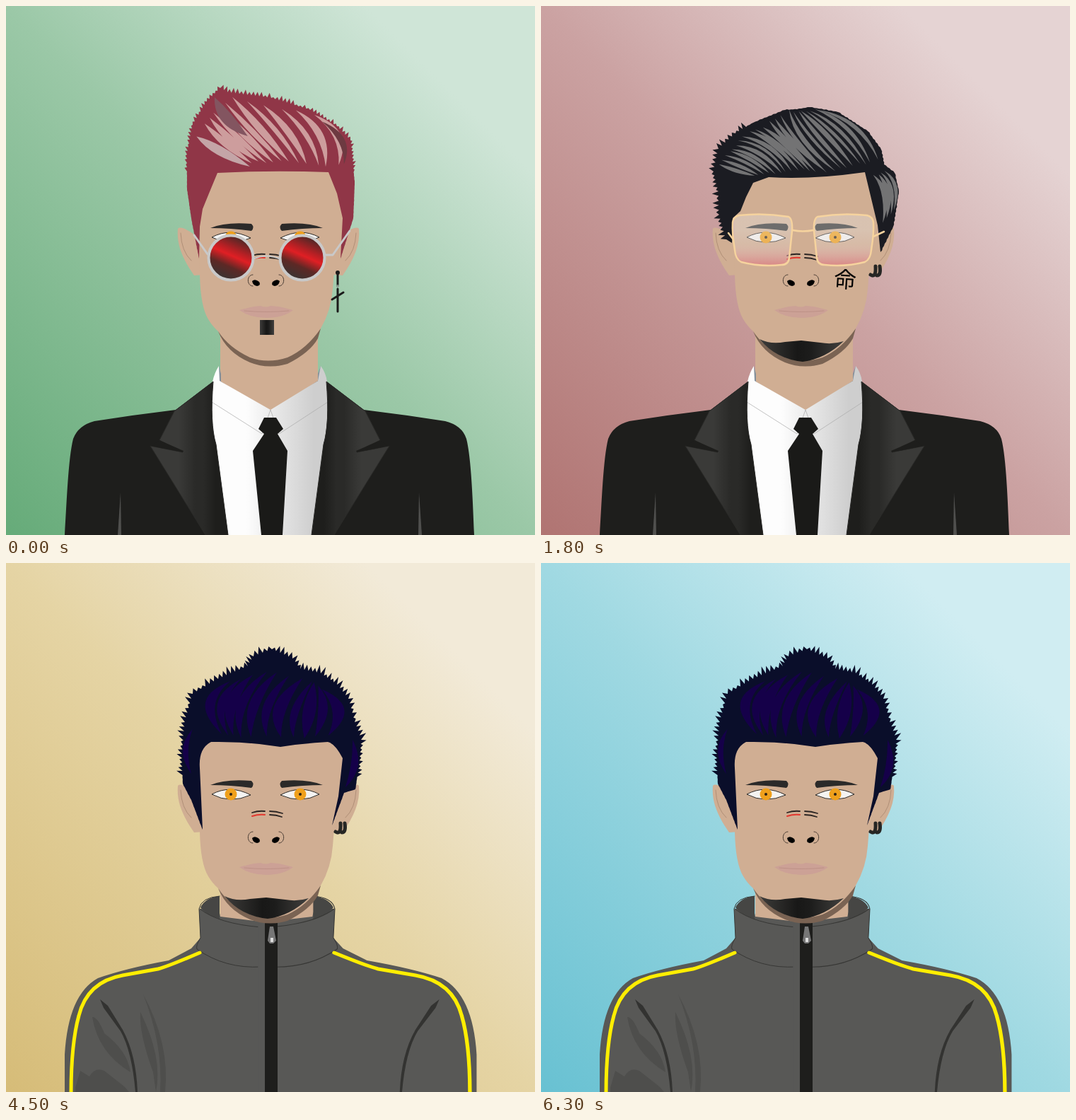
Recreate the animation shown at these times as an HTML page. Size 748 by 748 pixels, loop 7200 ms.

```html
<!DOCTYPE html>
<html lang="en">
<head>
<meta charset="utf-8">
<title>Portraits</title>
<style>
html, body { margin: 0; width: 100%; height: 100%; overflow: hidden; }
svg { display: block; width: 100vw; height: 100vh; }
.line { fill: none; stroke-linecap: round; stroke-linejoin: round; }
.skin { fill: #d0ae93; }
.cloth { fill: var(--cloth); }
.slit { fill: var(--slit); }
</style>
</head>
<body>
<svg viewBox="0 0 748 748">
<defs>
  <linearGradient id="sky" x1="0" y1="1" x2="1" y2="0">
    <stop style="stop-color:var(--low)"/><stop offset=".5" style="stop-color:var(--mid)"/><stop offset=".84" style="stop-color:var(--high)"/>
  </linearGradient>
  <linearGradient id="satin">
    <stop offset=".36" style="stop-color:var(--lapel1)"/><stop offset=".58" style="stop-color:var(--lapel2)"/>
    <stop offset=".68" style="stop-color:var(--lapel2)"/><stop offset=".84" style="stop-color:var(--lapel3)"/>
  </linearGradient>
  <linearGradient id="linen"><stop offset=".3" stop-color="#fdfdfd"/><stop offset=".6" stop-color="#e4e4e4"/><stop offset=".88" stop-color="#cecece"/></linearGradient>
  <linearGradient id="whisker"><stop stop-color="#3d3c3a"/><stop offset=".45" stop-color="#181817"/><stop offset=".6" stop-color="#1c1c1b"/><stop offset="1" stop-color="#41403e"/></linearGradient>
  <linearGradient id="ruby" x1=".3" y1=".95" x2=".7" y2=".05">
    <stop stop-color="#3a3432"/><stop offset=".3" stop-color="#5d2825"/><stop offset=".55" stop-color="#e01f24"/><stop offset=".7" stop-color="#b32024"/><stop offset="1" stop-color="#4b2826"/>
  </linearGradient>
  <linearGradient id="rose" x2="0" y2="1">
    <stop offset=".3" stop-color="#e8e8e8" stop-opacity=".35"/><stop offset=".58" stop-color="#e6d8d4" stop-opacity=".3"/><stop offset="1" stop-color="#dc7880" stop-opacity=".72"/>
  </linearGradient>
  <linearGradient id="pelt" x1=".1" y1="1" x2=".95" y2="0">
    <stop stop-color="#1e1a17"/><stop offset=".12" stop-color="#4a2c1d"/><stop offset=".5" stop-color="#6c5138"/><stop offset=".8" stop-color="#4b3020"/><stop offset="1" stop-color="#1e1b19"/>
  </linearGradient>
  <linearGradient id="fold" x2="1" y2=".8"><stop offset=".3" stop-color="#dadada"/><stop offset=".39" stop-color="#ebebeb"/><stop offset=".5" stop-color="#dadada"/><stop offset=".72" stop-color="#d0cccc"/><stop offset=".8" stop-color="#e2e2e2"/></linearGradient>
  <filter id="soft" x="-10%" y="-10%" width="120%" height="120%"><feGaussianBlur stdDeviation="1.6"/></filter>
</defs>

<rect width="748" height="748" fill="url(#sky)"/>
<path class="skin" d="M303 455V535L374 575 441 535V455Z"/>

<g id="suit" class="part">
  <path class="cloth" d="M83 748C86 700 88 640 95 612Q102 593 125 587 182 578 240 571L293 531 302 530 374 575 441 530 453 531 506 571Q564 578 621 587 645 593 651 612C658 640 660 700 662 748Z"/>
  <path fill="#85909a" d="M301 509L298 535 304 534V520ZM445 509L448 535 441 534V520Z"/>
  <path fill="url(#linen)" d="M301 509L302 530 374 571 441 530 445 509Q452 518 454 531 457 590 449 620L434 748H314L297 620Q288 590 292 531 295 518 301 509Z"/>
  <path class="line" stroke="#aaa" stroke-width=".7" d="M291 560L362 605 374 571 386 605 455 560"/>
  <g id="lapel">
    <path fill="url(#satin)" style="stroke:var(--edge)" d="M293 531L238 573 217 614 250 631 204 622 282 748H314L297 620Q288 590 293 531Z"/>
    <path class="cloth" d="M217 614L251 629 250 631 204 622Z"/>
    <path class="slit" d="M162 688L158 748H163Z"/>
  </g>
  <use href="#lapel" transform="matrix(-1 0 0 1 746 0)"/>
</g>
<path id="tie" class="part" fill="#1a1a18" d="M365 582H382L392 598 384 605 398 629 391 748H361L349 629 365 605 357 598Z"/>
<g id="bow" class="part">
  <path id="wing" fill="#272725" d="M311 559Q335 559 352 571L364 580V601L350 605Q335 611 315 628 302 612 300 597 309 580 311 559Z"/>
  <use href="#wing" transform="matrix(-1 0 0 1 744 0)"/>
  <rect x="362" y="580" width="21" height="20" rx="3" fill="#141412"/>
  <circle cx="372" cy="691" r="6" fill="#1c1c1a"/>
</g>

<g id="parka" class="part">
  <path fill="#dbdbdb" d="M61 748Q62 710 70 685 65 660 75 640 82 610 110 595L134 582 200 540H302L330 600H415L444 540H560L608 572 640 592Q667 605 682 632 692 650 691 685 698 710 698 748Z"/>
  <path class="line" stroke="#c4bdbd" stroke-width="3" filter="url(#soft)" d="M75 659H147M165 668H322M75 715H148M165 722H322M452 672H592M604 658H688M452 723H592M604 713H686"/>
  <path class="line" stroke="#aaa" stroke-width="2" d="M153 640Q160 690 158 748M602 640Q594 690 598 748"/>
  <path fill="#3c3c3a" d="M311 535Q376 561 442 535 446 570 470 608 440 640 438 748H322Q338 645 288 609 310 575 311 535Z"/>
  <path id="fur" fill="url(#pelt)"/>
  <use href="#fur" transform="matrix(-1 0 0 1 743 0)"/>
  <path fill="#ededed" d="M290 458Q302 460 301 477L303 490Q313 512 311 545 302 582 289 609 260 612 242 600 222 597 218 585 220 575 235 563 256 530 268 488 277 460 290 458Z"/>
  <path fill="url(#fold)" d="M441 465Q452 449 468 450 482 455 484 488 498 530 521 560 531 570 527 580 504 590 490 605 481 613 470 608 437 560 441 465Z"/>
  <g class="line">
    <path stroke="#f2f2f2" stroke-width="8" d="M285 614Q320 628 330 665 334 700 325 748M477 613Q446 645 442 690V748"/>
    <path stroke="#191918" stroke-width="4" d="M220 586Q226 594 241 597 255 614 282 613 317 628 327 665 331 700 321 748M525 578Q519 588 504 589 490 609 475 611 442 645 439 690V748"/>
  </g>
</g>

<g id="track" class="part">
  <g id="sleeve">
    <path fill="#585856" d="M83 748V695Q88 610 130 587 170 573 230 562L262 545 275 530 273 490Q300 475 303 500L376 509V748Z"/>
    <path fill="#464644" d="M275 487Q282 473 302 471V503Q283 498 275 487Z"/>
    <path class="line" stroke="#373735" d="M302 471Q276 473 273 489L275 530Q268 541 270 546 310 574 361 571V515Q300 510 274 489"/>
    <path fill="#333331" d="M133 617L144 626 165 660Q184 695 186 748H183Q178 690 162 662L138 629Z"/>
    <path class="line" stroke="#fe0" stroke-width="5" d="M274 551Q230 570 215 574L165 583Q115 592 103 640 92 680 92 750"/>
  </g>
  <use href="#sleeve" transform="matrix(-1.055 0 0 1 753 0)"/>
  <path fill="#4e4e4c" d="M194 610Q232 680 225 748H218Q222 680 194 610ZM122 642Q130 642 139 665 172 690 176 720 130 692 122 642ZM98 742L105 718 118 726Q126 712 139 718L167 740 174 748H98ZM190 635Q188 665 208 720L212 748Q222 700 190 635Z"/>
  <rect x="366" y="509" width="18" height="239" fill="#1e1e1c"/>
  <path fill="#777" d="M373 514H378L382 534 378 538H373L370 534Z"/><rect x="374" y="530" width="4" height="6" fill="#ddd"/>
</g>

<g id="ear">
  <path class="skin" d="M275 330C260 318 247 310 243 315 241 338 250 358 266 381L280 380Z"/>
  <path class="line" stroke="#a78770" stroke-width=".8" d="M247 321Q248 347 262 360"/>
</g>
<use href="#ear" transform="matrix(-1 0 0 1 742 0)"/>
<path class="skin" d="M273 230L274 380Q275 425 286 443 292 453 300 460 312 485 345 498 370 506 398 498 432 480 445 456 460 430 462 400L464 375 476 330V230Z"/>
<path fill="#7a6353" d="M300 460Q312 490 345 504 370 514 398 506 430 490 441 470L445 456Q425 485 398 497 370 506 345 497 315 483 300 460Z"/>
<path fill="#cca196" d="M330 430Q352 424 360 424 367 427 374 424 386 424 406 430 392 441 368 441 345 441 330 430Z"/>
<path class="line" stroke="#b98d83" stroke-width=".8" d="M337 431Q368 434 400 431"/>
<g id="nostril">
  <path class="line" stroke="#3b302a" stroke-width=".9" d="M349 380C340 380 340 396 349 396"/>
  <path d="M348 389Q352 385 358 390 361 395 355 396 349 395 348 389Z"/>
</g>
<use href="#nostril" transform="matrix(-1 0 0 1 735 0)"/>
<g id="eye">
  <path fill="#f4f3f1" stroke="#2c2926" d="M291 327Q317 313 346 328 317 341 291 327Z"/>
  <circle cx="318" cy="327" r="8.500" fill="#efa01c"/><circle cx="318" cy="327" r="2" fill="#2b2116"/>
</g>
<use href="#eye" transform="matrix(-1 0 0 1 734 0)"/>
<path id="brow" fill="#2b2a29" d="M289 314Q310 305 347 308 352 313 347 318 318 314 289 314Z"/>
<use href="#brow" transform="matrix(-1 0 0 1 737 0)"/>
<path class="line" stroke="#2b2523" stroke-width="1.8" d="M348 353Q357 350 366 351M373 351Q382 351 391 354M373 356Q382 356 390 359"/>
<path class="line" stroke="#e2382f" stroke-width="2" d="M348 358Q357 355 366 356"/>
<text id="sign" class="part" x="430" y="398" font-size="31" text-anchor="middle" transform="rotate(4 430 387)" font-family="'Noto Sans CJK JP','Noto Sans CJK SC','Noto Sans CJK',sans-serif">命</text>

<rect id="patch" class="part" x="359" y="444" width="20" height="21" fill="url(#whisker)"/>
<path id="beard" class="part" fill="url(#whisker)" d="M309 471Q325 479 345 475L368 473 395 476Q412 479 428 474 402 499 370 503 332 499 309 471Z"/>

<g id="pink" class="part"></g>
<g id="black" class="part"></g>
<g id="navy" class="part"></g>

<g id="round" class="part line" stroke="#c9c9c9" stroke-width="3">
  <path d="M285 351L266 324M451 352H462L486 318"/><path stroke-width="2" d="M349 358Q369 349 388 358"/>
  <circle cx="318" cy="356" r="31.500" stroke-width="4" fill="url(#ruby)"/><circle cx="419" cy="356" r="31.500" stroke-width="4" fill="url(#ruby)"/>
</g>
<g id="square" class="part line" stroke="#f6d39e" stroke-width="2.500">
  <path id="lens" fill="url(#rose)" d="M280 296Q315 292 350 298 356 301 355 318L351 356Q350 366 340 366 310 369 283 362 275 358 274 345 270 320 271 306 272 298 280 296Z"/>
  <use href="#lens" transform="matrix(-1 0 0 1 741 0)"/>
  <path d="M356 317Q370 320 385 317M271 329L265 321M470 326L485 319"/>
</g>
<g id="cross" class="part line" stroke="#1b1b1a" stroke-width="3">
  <circle cx="469" cy="377" r="3" fill="#1b1b1a" stroke="none"/><path d="M469 377V394M469 400V432M461 415L477 405"/><circle cx="469" cy="396" r="1.500" stroke="#888" stroke-width="1"/>
</g>
<path id="hoops" class="part line" stroke="#262624" stroke-width="5" d="M466 380Q474 385 473 368M475 381Q481 381 479 368"/>
</svg>
<script>
const svg = document.querySelector('svg');
const byId = id => document.getElementById(id);
let seed = 11;
const random = () => (seed = seed * 16807 % 2147483647) / 2147483647;
const mix = (a, b, t) => a.map((v, i) => v + (b[i] - v) * t);
const parse = text => text.split(' ').map(point => point.split(',').map(Number));

// Walks clockwise through the points and grows a spike on every step; size depends on the place.
function ragged(text, step, size, lift = 0) {
  const points = parse(text);
  let d = 'M' + points[0];
  for (let i = 1; i < points.length; i++) {
    const [a, b] = [points[i - 1], points[i]];
    const [dx, dy] = [b[0] - a[0], b[1] - a[1]];
    const length = Math.hypot(dx, dy), count = Math.ceil(length / step);
    for (let k = 0; k < count; k++) {
      const [x, y] = mix(a, b, (k + .5) / count);
      const s = size(x, y) * (.3 + .9 * random());
      d += `L${x + dy / length * s} ${y - dx / length * s - lift * s}L${mix(a, b, (k + 1) / count)}`;
    }
  }
  return d;
}

const add = (id, colour, d) => byId(id).insertAdjacentHTML('beforeend', `<path fill="${colour}" d="${d}"/>`);

// Tapered locks spread between guide curves, each given by start, bend and end.
function locks(id, colour, count, width, ...guides) {
  guides = guides.map(text => parse(text).flat());
  let d = '';
  for (let i = 0; i < count; i++) {
    const place = (guides.length - 1) * i / Math.max(1, count - 1);
    const g = Math.min(Math.floor(place), Math.max(0, guides.length - 2));
    const [x, y, bx, by, ex, ey] = mix(guides[g], guides[g + 1] || guides[g], place - g).map(v => v + 5 * (random() - .5));
    const w = width * (.7 + .6 * random()), length = Math.hypot(ex - x, ey - y);
    const nx = (ey - y) / length * w, ny = (x - ex) / length * w;
    d += `M${x} ${y}Q${bx + nx} ${by + ny} ${ex} ${ey}Q${bx - nx} ${by - ny} ${x} ${y}Z`;
  }
  add(id, colour, d);
}

byId('fur').setAttribute('d', ragged('302,540 261,615 170,637 113,634 146,560 160,518 192,473 230,448 280,437 300,447', 3, () => 3) + 'Z');

add('pink', '#903647', ragged('273,357 262,300 256,258 256,210 264,168 284,135 303,116 313,122 375,130 430,147 468,170 487,190 490,220 493,250 491,300 473,357',
  6, (x, y) => y < 235 ? 4 : .3, .6) + 'L476 300 468 265 456 235Q375 232 299 236L287 265 278 287 274 312Z');
locks('pink', '#cd9d9d', 11, 9, '280,165 305,195 348,220', '318,130 360,175 398,222', '435,155 482,180 468,226');
locks('pink', '#c4a5a7', 1, 12, '268,183 296,204 346,225');
locks('pink', '#835560', 1, 14, '297,130 304,162 342,182');
locks('pink', '#6d3a41', 1, 8, '445,163 488,186 480,224');

add('black', '#1b1c22', ragged('262,330 252,295 251,262 244,234 251,202 275,180 300,165 345,147 362,146 380,143 420,150 462,177 481,203 485,224 500,236 506,262 498,312 480,348',
  7, x => x < 290 ? 8 : .8) + 'L476 310 458 235Q380 246 322 242L300 250 290 270 282 290 271 300 270 335Z');
locks('black', '#737374', 22, 5.5, '252,224 275,232 300,240', '285,184 325,190 355,232', '350,149 360,190 415,234', '392,146 455,160 476,218');
locks('black', '#737374', 4, 7, '470,238 492,262 485,308', '486,232 510,252 498,290');

add('navy', '#0a0e2a', ragged('278,377 262,335 250,312 249,270 253,225 264,185 300,164 342,146 350,132 376,122 405,135 416,150 445,156 468,172 484,192 493,225 502,250 499,285 494,320 478,325 461,371',
  7, (x, y) => y < 300 ? 8 : .3, .4) + 'L470 330 476 276Q465 255 455 253 420 255 388 260 340 252 290 253 272 262 274 290Z');
locks('navy', '#150049', 11, 15, '318,168 268,195 304,242', '372,150 325,195 336,246', '430,165 385,210 400,246', '445,178 490,205 455,245');
locks('navy', '#150049', 1, 9, '488,250 498,285 480,316');
locks('navy', '#150049', 1, 9, '262,235 246,262 262,300');

const skies = {
  green: ['#66ab79', '#9bc8a7', '#cfe5d7'], pink: ['#b07472', '#cba2a2', '#e5d3d3'],
  purple: ['#2a153f', '#55297f', '#8340bf'], gold: ['#d6bc78', '#e5d4a4', '#f2ead8'],
  teal: ['#0c2a2c', '#1b585b', '#278388'], blue: ['#68c1d2', '#a0d9e2', '#d0edf2']
};
const cloths = {
  black: ['#1e1e1c', '#50504e', '#3a3a38', '#2a2a28', '#1e1e1c', '#2a2a28'],
  blue: ['#0a0054', '#37288a', '#2a225f', '#1c1167', '#12101f', '#1d173c']
};
const scenes = [
  ['green', 'black', 'suit tie pink round patch cross'],
  ['blue', 'black', 'suit tie black round patch cross'],
  ['pink', 'black', 'suit tie black square beard hoops sign'],
  ['purple', 'black', 'parka black square beard hoops sign'],
  ['gold', 'blue', 'suit bow pink square beard hoops sign'],
  ['gold', 'blue', 'track navy beard hoops'],
  ['teal', 'blue', 'suit bow navy beard hoops'],
  ['blue', 'blue', 'track navy beard hoops']
];
const parts = document.querySelectorAll('.part');
const setVars = (names, values) => names.forEach((name, i) => svg.style.setProperty('--' + name, values[i]));

let shown = -1;
function draw(now) {
  const index = Math.floor(now / 900) % scenes.length;
  if (index !== shown) {
    shown = index;
    const [sky, cloth, list] = scenes[index];
    const visible = list.split(' ');
    setVars(['low', 'mid', 'high'], skies[sky]);
    setVars(['cloth', 'slit', 'lapel1', 'lapel2', 'lapel3', 'edge'], cloths[cloth]);
    parts.forEach(part => part.style.display = visible.includes(part.id) ? '' : 'none');
  }
  requestAnimationFrame(draw);
}
draw(0);
</script>
</body>
</html>
```
